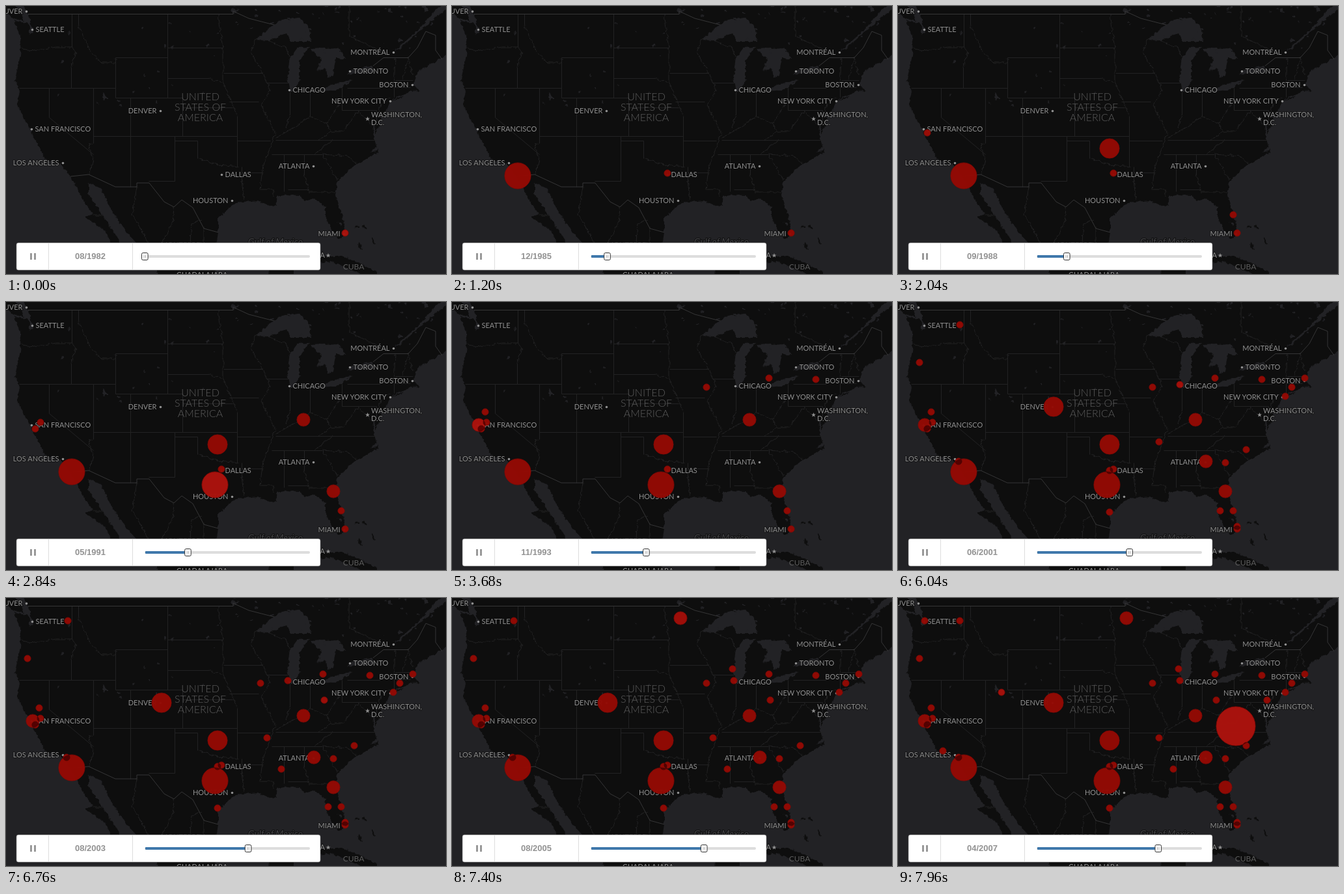
An HTML page for the animation above (8000 ms loop, 676 px wide and 412 px high).

```html
<!DOCTYPE html>
<html lang="en">
<head>
<meta charset="utf-8">
<title>Timeline map</title>
<style>
  html, body { margin: 0; width: 100%; height: 100%; overflow: hidden; background: #222225; }
  svg { display: block; width: 676px; height: 412px; }
  .land { fill: #0e0e0e; }
  .water { fill: #222225; }
  .line { fill: none; stroke: #222223; stroke-linejoin: round; }
  .nation { stroke: #353536; }
  .city { font: 11px Lato, "Open Sans", sans-serif; fill: #8f8f8f; stroke: #0e0e0e; stroke-width: 2; stroke-opacity: .6; paint-order: stroke; }
  .country { font: 300 16px Lato, sans-serif; fill: #5c5c5c; text-anchor: middle; }
  .sea { font: italic 14px Lato, sans-serif; fill: #434346; stroke: #111; stroke-width: 2; paint-order: stroke; }
  .dots { isolation: isolate; opacity: .97; }
  .dots circle { mix-blend-mode: multiply; }
  .date { font: bold 13px "Liberation Sans", Arial, sans-serif; fill: #929292; text-anchor: middle; }
</style>
</head>
<body>
<svg viewBox="0 0 676 412">
  <defs>
    <filter id="rough" x="0" y="0" width="676" height="412" filterUnits="userSpaceOnUse" color-interpolation-filters="sRGB">
      <feTurbulence type="fractalNoise" baseFrequency=".16" numOctaves="2" seed="4"/>
      <feDisplacementMap in="SourceGraphic" scale="6" xChannelSelector="R" yChannelSelector="G"/>
    </filter>
  </defs>
  <rect class="water" width="676" height="412"/>
  <g filter="url(#rough)">
    <g class="land" id="land"></g>
    <g class="water" id="lakes"></g>
    <g class="line" id="rivers"></g>
  </g>
  <g class="line" id="grid"></g>
  <g class="line nation" id="nations"></g>
  <g id="labels"></g>
  <g class="dots" id="dots"></g>
  <rect x="16" y="364" width="467" height="42" rx="3" fill="#fff" stroke="#777" stroke-width=".6"/>
  <path d="M65.5 365V405M194.5 365V405" stroke="#ddd"/>
  <path d="M38.5 380V390M44.5 380V390" stroke="#999" stroke-width="3"/>
  <text class="date" id="date" x="129.5" y="389"></text>
  <rect x="213" y="383" width="254" height="4" rx="2" fill="#ddd"/>
  <rect id="fill" x="214" y="383" height="4" rx="1" fill="#3f78ab"/>
  <g id="knob">
    <rect x="-4.8" y="379.5" width="9.6" height="11" rx="2" fill="#fff" stroke="#333"/>
    <path d="M-1.2 383V387M1.2 383V387" stroke="#aaa"/>
  </g>
</svg>
<script>
const $ = id => document.getElementById(id);

function add(parent, tag, attrs, text) {
  const el = document.createElementNS('http://www.w3.org/2000/svg', tag);
  for (const k in attrs) el.setAttribute(k, attrs[k]);
  if (text) el.textContent = text;
  return parent.appendChild(el);
}
const addPath = (id, d, attrs) => add($(id), 'path', { d, ...attrs });

// key points of the coasts; the filter adds the fine jaggedness
const pacific = 'M17-9L32 7 42 40 36 44 36 27 13 23 21 46 23 71 14 113 21 132 16 151 35 184 45 206 60 235 84 243 99 262';
const baja = 'L121 303 134 320 122 324 154 347 160 366 186 385 164 345 127 289 127 272 145 280 164 318 187 350 231 397 234 425';
const gulf = 'H324L319 394 326 348 326 325 353 302 387 299 405 307 416 308 415 293 433 290 451 291 459 299 474 295 490 309 490 324 501 346 510 358';
const atlantic = 'L519 353 521 338 506 292 509 271 534 246 572 225 565 202 561 168 568 197 577 174 573 164 581 171 591 145 621 131 636 130 625 121 633 101 676 76 699 70V-9Z';
const bahamas = 'M534 340H543M549 337L554 343M541 364L547 374M562 356L567 366';

addPath('land', pacific + baja + gulf + atlantic);
addPath('land', 'M-9 3L12 20 29 23 22 11 8-9ZM590 146L612 138 604 143Z');
addPath('land', 'M466 398L487 385 520 385 570 409V425L539 409 499 392ZM402 425L404 405 442 403V425Z');
addPath('land', bahamas, { stroke: '#0e0e0e', 'stroke-width': 2.5 });

addPath('lakes', 'M383 52L419 23 450 18 465 31 469 55 437 55 431 42 403 53Z');
addPath('lakes', 'M436 131L432 110 436 80 448 64 466 63 451 84 451 114 442 131Z');
addPath('lakes', 'M468 66L510 64 523 82 507 80 502 106 494 111 492 96 478 100 484 81Z');
addPath('lakes', 'M483 131L500 121 533 113 510 129ZM524 106L532 98 564 92 565 101Z');
addPath('lakes', 'M596 70L632 38 662 4 676-6H690L645 30 607 64Z');
addPath('lakes', 'M148 132L158 143 150 143ZM346 4L358 6 348 12ZM509 333H515V338ZM559 225L570 216V223Z');
addPath('land', 'M0 0');

// scattered small lakes, denser in the north
let seed = 11;
const rnd = () => (seed = seed * 16807 % 2147483647) / 2147483647;
for (let i = 0; i < 75; i++) {
  const north = i < 52;
  add($('lakes'), 'ellipse', {
    cx: north ? 350 + rnd() * 320 : 60 + rnd() * 280,
    cy: north ? rnd() * rnd() * 75 : 25 + rnd() * 130,
    rx: .8 + rnd() * 2.2, ry: .6 + rnd() * 1.8
  });
}

// borders along parallels and meridians, then those along rivers and ridges
const shift = { transform: 'translate(.5 .5)' };
addPath('grid', 'M20 126H168M168 79H248M66 126V171L134 228M134 126V211M101 63V12M100 94V126M111 12V29M168 79V141H271V156H348M248 12V141', shift);
addPath('grid', 'M191 141V278M134 200H355M271 156V200M259 200V269H219M259 207H294V234M248 64H333M248 111H311M355 169V247M362 247V269', shift);
addPath('grid', 'M334 103H394M343 147H388M355 207H406M362 256H395M400 118H433M436 131V167M441 131H483M467 131V170M414 206H569M408 228H486', shift);
addPath('grid', 'M458 228V258M433 282H465M427 228V285M516 126V160H569V179M524 126H575M596 125V140M596 125H621M598 114H625', shift);
addPath('rivers', 'M24 64L36 69 78 63H101L107 71 100 94M111 29L130 70 146 87H168M134 211L127 213 134 238 127 259');
addPath('rivers', 'M294 234L326 244 357 247M326 12L334 74V118L355 169M311 111L334 118M362 269L366 298M403 53L430 64 436 78');
addPath('rivers', 'M384 51L376 71 394 103 406 129 392 152 414 196 395 246 390 282H411V293M414 203L444 186 467 170 492 180 516 147');
addPath('rivers', 'M436 167L430 188M473 228L502 206M486 228L510 268M486 228L527 231 540 245M458 258L466 286H506');
addPath('rivers', 'M480 206L499 193 492 180M499 193H518L541 161 564 186M573 164L576 143 591 141M596 125L598 79M609 114L618 79 625 106M585 74L527 46V0');
addPath('rivers', 'M201 278L194 320 219 364M258 309L256 332 240 364M300 328L285 334 283 364M303 340V364M134 322H148');
addPath('nations', 'M34 12.5H349V8L373 19 412 29M564 92L580 79.5H618L632 64 645 39 660 45V68L670 82');
addPath('nations', 'M99 262L127 259 168 278H201V272H220L243 301 258 309 270 298 287 310 304 342 326 348');

// text, dot x, dot y, side of the label
const cities = [
  ['VANCOUVER', 31, 9, -1], ['SEATTLE', 40, 37, 1], ['SAN FRANCISCO', 39, 190, 1],
  ['LOS ANGELES', 87, 242, -1], ['DENVER', 237, 162, -1], ['DALLAS', 331, 260, 1],
  ['HOUSTON', 347, 300, -1], ['CHICAGO', 435, 130, 1], ['ATLANTA', 472, 247, -1],
  ['MIAMI', 519, 351, -1], ['NEW YORK CITY', 590, 147, -1], ['BOSTON', 624, 122, -1],
  ['TORONTO', 528, 101, 1], ['MONTRÉAL', 595, 72, -1]
];
const label = (cls, x, y, text, attrs) => add($('labels'), 'text', { class: cls, x, y, ...attrs }, text);
for (const [name, x, y, side] of cities) {
  add($('labels'), 'circle', { cx: x + .5, cy: y - .5, r: 1.8, fill: '#8f8f8f' });
  label('city', x + side * 5.5, y + 3, name, { 'text-anchor': side > 0 ? 'start' : 'end' });
}
label('city', 561, 171, 'WASHINGTON,');
label('city', 561, 183, 'D.C.');
label('city', 490, 387, 'HAVANA', { 'text-anchor': 'end' });
label('city', 262, 417, 'GUADALAJARA');
label('city', 238, 371, 'MONTERREY', { opacity: .3 });
const star = 'M0-3.5L1-1H3.4L1.5.6 2.2 3 0 1.5-2.2 3-1.5.6-3.4-1H-1Z';
for (const at of ['555.5 173.5', '495 383.5']) addPath('labels', star, { fill: '#8f8f8f', transform: `translate(${at})` });
['UNITED', 'STATES OF', 'AMERICA'].forEach((w, i) => label('country', 298.5, 145 + i * 16, w));
label('country', 534, 405, 'CUBA', { style: 'font-size:12px;font-weight:400' });
label('sea', 372, 367, 'Gulf of Mexico');

// piecewise linear curve through [x, y] key points
function along(keys, x) {
  const i = Math.max(1, keys.findIndex(k => k[0] >= x));
  const [x0, y0] = keys[i - 1], [x1, y1] = keys[i];
  return y0 + (y1 - y0) * (x - x0) / (x1 - x0);
}

// x, y and size step, in order of appearance
const places = [
  [521, 349], [331, 257], [101, 261, 4], [325, 219, 3], [515, 321], [45, 195], [53, 185], [457, 181, 2],
  [503, 291, 2], [321, 281, 4], [391, 131], [487, 117], [51, 169], [559, 119], [41, 189, 2], [535, 227],
  [595, 145], [95, 35], [325, 323], [521, 345], [503, 247], [93, 245], [401, 215], [605, 131],
  [33, 93], [239, 161, 3], [473, 245, 2], [325, 259], [495, 321], [625, 117], [433, 127], [423, 263],
  [489, 157], [431, 109], [351, 31, 2], [69, 235], [41, 35], [567, 157], [159, 145], [519, 197, 6]
];
const arrivals = [[0, 0], [1, 22], [2, 23], [3, 48], [9, 104], [19, 162], [20, 181], [30, 222], [34, 271], [35, 281], [39, 296]];
const dots = places.map(([cx, cy, size = 1], i) => ({
  month: along(arrivals, i),
  el: add($('dots'), 'circle', { cx, cy, r: 5 * size + .1, stroke: '#850a06', 'stroke-width': .8 })
}));

const LOOP = 8000;
const pace = [[0, 0], [1200, 40], [2840, 105], [4760, 175], [6040, 226], [7400, 276], [LOOP, 297.4]];

function draw(t) {
  const m = Math.floor(along(pace, t) + .001);
  for (const { month, el } of dots) {
    const age = m - month;
    const glow = Math.max(0, Math.min(1, (8 - age) / 5));
    el.style.display = age < 0 ? 'none' : '';
    el.setAttribute('fill', `rgb(${148 + 24 * glow},${10 + 9 * glow},${4 + 9 * glow})`);
  }
  const n = m + 7;
  $('date').textContent = String(n % 12 + 1).padStart(2, '0') + '/' + (1982 + Math.floor(n / 12));
  const x = 213.3 + m * .63;
  $('knob').setAttribute('transform', `translate(${x})`);
  $('fill').setAttribute('width', Math.max(0, x - 214));
}

const start = performance.now();
function tick() {
  draw((performance.now() - start) % LOOP);
  requestAnimationFrame(tick);
}
draw(0);
requestAnimationFrame(tick);
</script>
</body>
</html>
```
